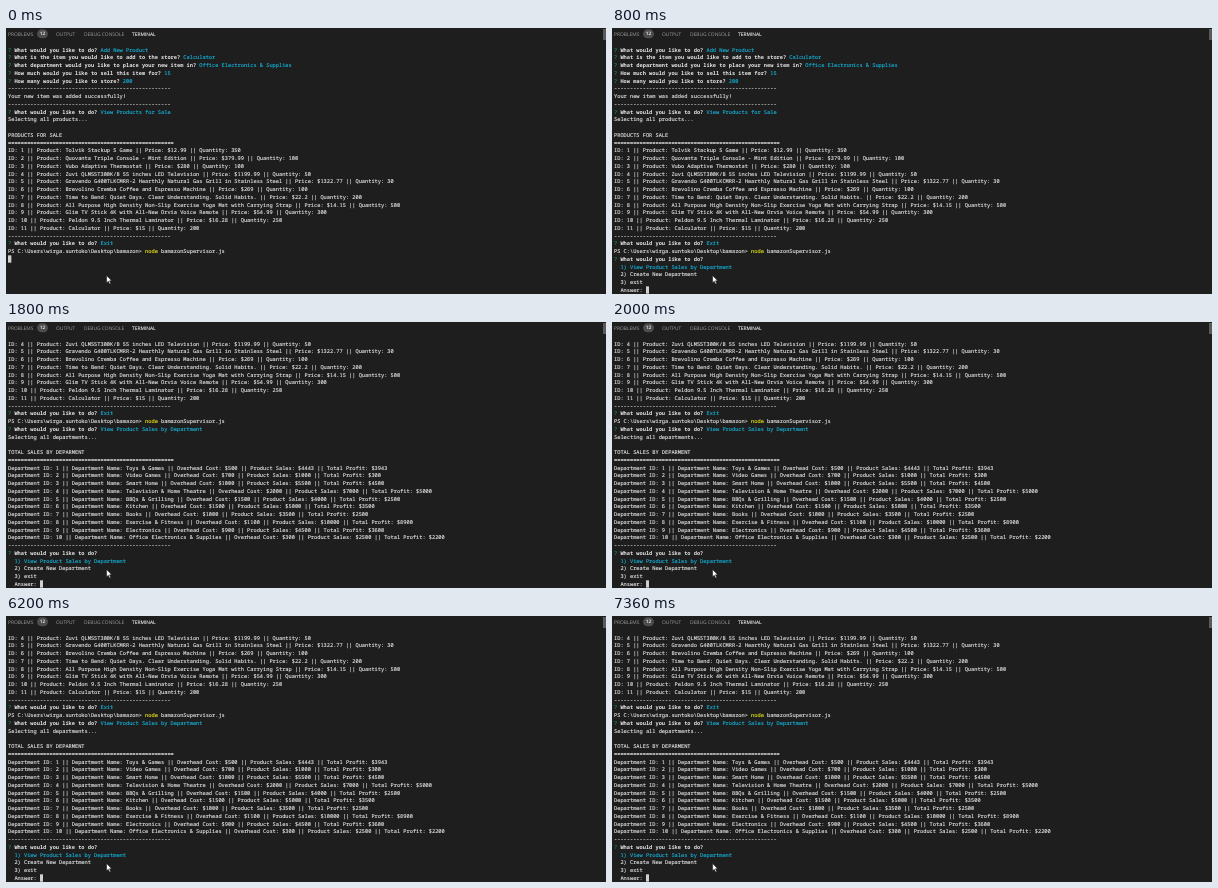
Write an HTML page that moves like this. It is 600 px wide and 266 px high and loops after 8000 ms.

```html
<!DOCTYPE html>
<html lang="en">
<head>
<meta charset="utf-8">
<title>Terminal session</title>
<style>
  html, body { margin: 0; width: 100%; height: 100%; overflow: hidden; background: #1e1e1e; }
  #stage { position: relative; width: 600px; height: 266px; overflow: hidden; background: #1e1e1e; }
  #stage > * { position: absolute; }

  /* Laid out at three times the size so that rows keep fractional positions. */
  .screen, .tabs { transform: scale(calc(1 / 3)); transform-origin: 0 0; text-rendering: geometricPrecision; white-space: pre; }
  .screen {
    left: 1.7px; top: 18.1px; margin: 0; visibility: hidden;
    font: 15.95px/23.25px "Noto Sans Mono", "DejaVu Sans Mono", monospace;
    font-variant-ligatures: none; color: #e2e2e2; -webkit-text-stroke: .4px;
  }
  .screen b { color: #e8e8e8; -webkit-text-stroke: 0; }
  .mark { color: #0dbc79; -webkit-text-stroke: 0; }
  .pick { color: #14b0d8; }
  .cmd { color: #e5e510; }
  .caret { display: inline-block; width: 9.6px; height: 22px; vertical-align: top; background: #d0d0d0; }

  .tabs { left: 0; top: 0; font: 14.7px/36px "Open Sans", "Noto Sans", sans-serif; color: #a0a0a0; }
  .tabs span { position: absolute; top: 0; }
  .tabs .active { color: #f0f0f0; -webkit-text-stroke: .3px; }
  .tabs .badge {
    top: 4px; left: 93px; width: 33px; height: 27px; border-radius: 14px;
    font-size: 14px; line-height: 27px; font-weight: 600; text-align: center;
    background: #4d4d4d; color: #fff;
  }
  .thumb { left: 596.5px; top: 1px; width: 3.5px; height: 10.5px; background: #5a5a5a; }
  .pointer { left: 100px; top: 247px; }
</style>
</head>
<body>
<div id="stage">
  <div class="tabs">
    <span style="left:6px">PROBLEMS</span><span class="badge">12</span>
    <span style="left:150px">OUTPUT</span>
    <span style="left:234px">DEBUG CONSOLE</span>
    <span class="active" style="left:378px">TERMINAL</span>
  </div>
  <div class="thumb"></div>
  <svg class="pointer" width="7" height="10" viewBox="0 0 7 10">
    <path d="M.6.6v7.2l1.7-1.5 1.2 2.6 1.2-.5-1.2-2.6h2.2z" fill="#fff" stroke="#111" stroke-width=".5"/>
  </svg>
</div>
<script>
const LOOP = 8000;
const stage = document.getElementById('stage');

const escape = text => text.replace(/&/g, '&amp;').replace(/>/g, '&gt;');
const tint = (name, text) => `<span class="${name}">${escape(text)}</span>`;
const ask = (question, answer = '') =>
  `${tint('mark', '?')} <b>${question}</b> ${tint('pick', answer)}`;

const TODO = 'What would you like to do?';
const dashes = '-'.repeat(51);
const equals = '='.repeat(52);
const caret = '<span class="caret"></span>';

const products = [
  ['Tolvik Stackup 5 Game', '12.99', 350],
  ['Quovanta Triple Console - Mint Edition', '379.99', 100],
  ['Vubo Adaptive Thermostat', '280', 100],
  ['Zuvi QLM55T300K/B 55 inches LED Television', '1199.99', 50],
  ['Gravendo G400TLKCMRR-2 Hearthly Natural Gas Grill in Stainless Steel', '1322.77', 30],
  ['Brevolino Cremba Coffee and Espresso Machine', '269', 100],
  ['Time to Bend: Quiet Days. Clear Understanding. Solid Habits.', '22.2', 200],
  ['All Purpose High Density Non-Slip Exercise Yoga Mat with Carrying Strap', '14.15', 500],
  ['Glim TV Stick 4K with All-New Orvia Voice Remote', '54.99', 300],
  ['Peldon 9.5 Inch Thermal Laminator', '16.28', 250],
  ['Calculator', '15', 200],
].map(([name, price, count], i) =>
  `ID: ${i + 1} || Product: ${name} || Price: $${price} || Quantity: ${count}`);

const departments = [
  ['Toys & Games', 500, 4443],
  ['Video Games', 700, 1000],
  ['Smart Home', 1000, 5500],
  ['Television & Home Theatre', 2000, 7000],
  ['BBQs & Grilling', 1500, 4000],
  ['Kitchen', 1500, 5000],
  ['Books', 1000, 3500],
  ['Exercise & Fitness', 1100, 10000],
  ['Electronics', 900, 4500],
  ['Office Electronics & Supplies', 300, 2500],
].map(([name, cost, sales], i) => escape(
  `Department ID: ${i + 1} || Department Name: ${name} || Overhead Cost: $${cost}` +
  ` || Product Sales: $${sales} || Total Profit: $${sales - cost}`));

const leave = [
  dashes,
  ask(TODO, 'Exit'),
  `${escape('PS C:\\Users\\wirga.suntoko\\Desktop\\bamazon>')} ${tint('cmd', 'node')} bamazonSupervisor.js`,
];

const menu = [
  ask(TODO),
  '  ' + tint('pick', '1) View Product Sales by Department'),
  '  2) Create New Department',
  '  3) exit',
  '  Answer: ' + caret,
];

const history = [
  ask(TODO, 'Add New Product'),
  ask('What is the item you would like to add to the store?', 'Calculator'),
  ask('What department would you like to place your new item in?', 'Office Electronics & Supplies'),
  ask('How much would you like to sell this item for?', '15'),
  ask('How many would you like to store?', '200'),
  dashes,
  'Your new item was added successfully!',
  dashes,
  ask(TODO, 'View Products for Sale'),
  'Selecting all products...',
  '',
  'PRODUCTS FOR SALE',
  equals,
  ...products,
  ...leave,
];

const report = [
  ...products.slice(3),
  ...leave,
  ask(TODO, 'View Product Sales by Department'),
  'Selecting all departments...',
  '',
  'TOTAL SALES BY DEPARMENT',
  equals,
  ...departments,
  dashes,
  ...menu,
];

const scenes = [
  { start: 0, lines: [...history, caret] },
  { start: 600, lines: [...history, ...menu] },
  { start: 1800, lines: report },
];

// Products sliced into the report keep their ids because they are numbered first.
const pointer = stage.querySelector('.pointer');
for (const scene of scenes) {
  scene.el = document.createElement('pre');
  scene.el.className = 'screen';
  scene.el.innerHTML = scene.lines.join('\n');
  stage.insertBefore(scene.el, pointer);
}

const origin = performance.now();
function draw() {
  const time = (performance.now() - origin) % LOOP;
  const current = scenes.filter(scene => scene.start <= time).pop();
  for (const scene of scenes) {
    scene.el.style.visibility = scene === current ? 'visible' : 'hidden';
  }
  requestAnimationFrame(draw);
}
draw();
</script>
</body>
</html>
```
